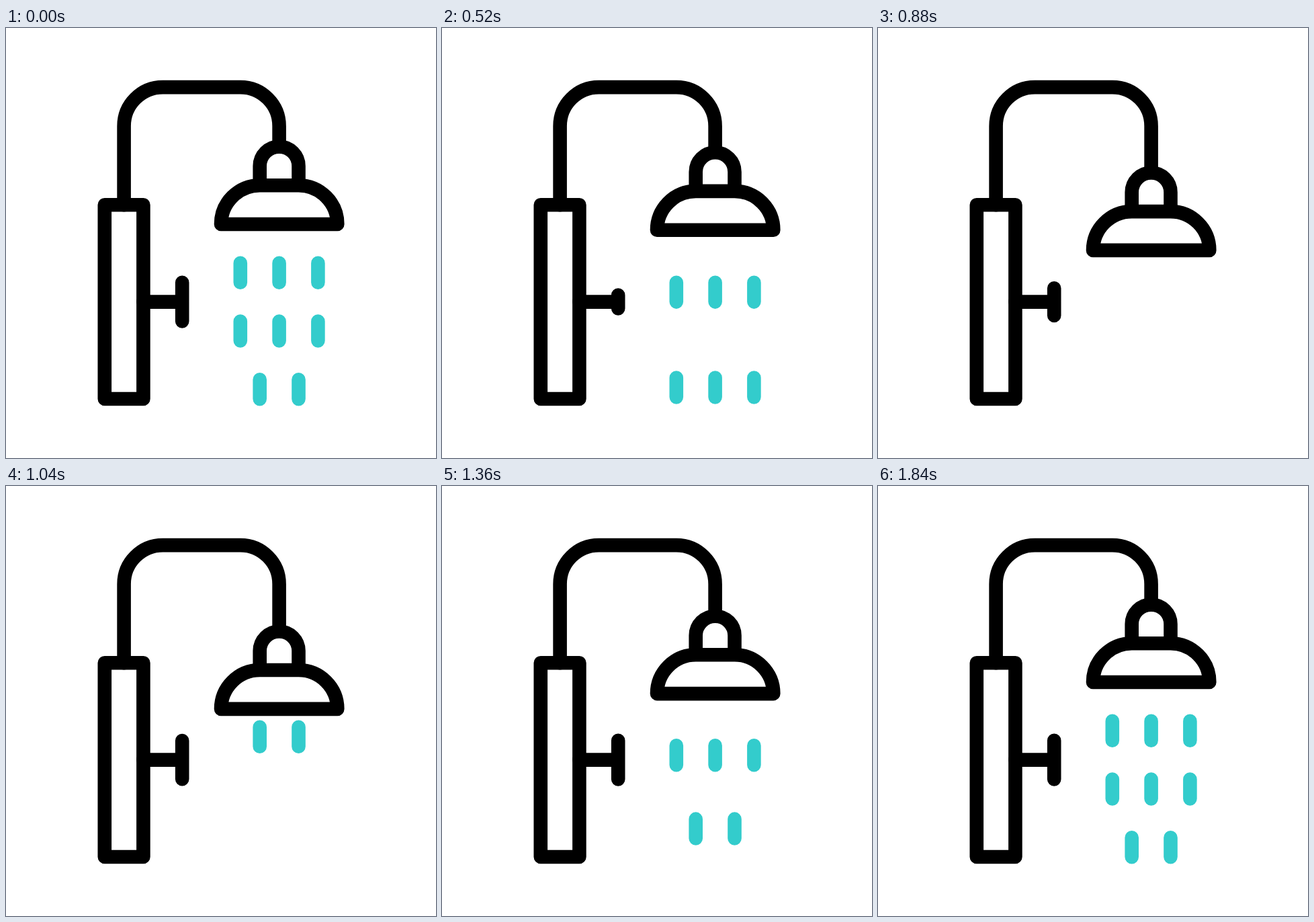
Recreate the animation shown at these times as an HTML page. Size 640 px wide and 640 px high, loop 1.92 s.

```html
<!DOCTYPE html>
<html lang="en">
<head>
<meta charset="utf-8">
<title>Shower</title>
<style>
  html, body { margin: 0; width: 100%; height: 100%; overflow: hidden; background: #fff; }
  svg { display: block; width: 100%; height: 100%; }
  path { fill: none; stroke: #000; stroke-width: 20.6; stroke-linecap: round; stroke-linejoin: round; }
  .drops { stroke: #3cc; }
  #head path { fill: #fff; }
</style>
</head>
<body>
<svg viewBox="0 0 640 640">
  <path class="drops" d="M348.8 349.9v28.9M406.6 349.9v28.9M464.4 349.9v28.9"/>
  <path class="drops" d="M348.8 436.5v28.9M406.6 436.5v28.9M464.4 436.5v28.9"/>
  <path class="drops" d="M377.7 523.2v28.9M435.5 523.2v28.9"/>
  <!-- hides the drops until they leave the head -->
  <rect id="cover" x="330" width="155" fill="#fff"/>
  <path id="pipe"/>
  <path d="M146.8 263.3h57.6v288.7h-57.6z"/>
  <path id="handle"/>
  <g id="head">
    <path d="M377.7 234v-28.5a28.9 28.9 0 0 1 57.8 0V234"/>
    <path d="M320 292a57.8 57.8 0 0 1 57.8-57.8h57.7A57.8 57.8 0 0 1 493.3 292z"/>
  </g>
</svg>
<script>
const LOOP = 1920, STEP = 40;
const get = id => document.getElementById(id);
const [cover, pipe, handle, head] = ['cover', 'pipe', 'handle', 'head'].map(get);
const rows = document.querySelectorAll('.drops');
const leave = [296, 178, 97];
const arrive = [1842, 1728, 1646];

// cubic-bezier(.6, 0, .4, 1)
function ease(x) {
  if (x <= 0) return 0;
  if (x >= 1) return 1;
  let lo = 0, hi = 1, s;
  for (let i = 0; i < 24; i++) {
    s = (lo + hi) / 2;
    const r = 1 - s;
    if (1.8 * s * r * r + 1.2 * s * s * r + s ** 3 < x) lo = s; else hi = s;
  }
  return s * s * (3 - 2 * s);
}

// 0 to 1 between a and b, back to 0 between b and c
const swing = (t, a, b, c) => ease((t - a) / (b - a)) - ease((t - b) / (c - b));

// rows speed up out of the stage, then come from the head and slow down
function dropOffset(t, i) {
  if (t < 880) return 17.5 * (Math.max(0, t - leave[i]) / 184) ** 2.53;
  return -36.5 * (Math.max(0, arrive[i] - t) / 322) ** 2.38;
}

function draw(t) {
  const drop = 40 * swing(t, 240, 1000, 1680);
  const half = 28.9 - 20.2 * swing(t, 140, 630, 1100);
  head.setAttribute('transform', `translate(0 ${drop})`);
  cover.setAttribute('height', 292 + drop);
  pipe.setAttribute('d', `M175.6 263.3V145.9a57.8 57.8 0 0 1 57.8-57.8h115.4a57.8 57.8 0 0 1 57.8 57.8V${176.6 + drop}`);
  handle.setAttribute('d', `M204.4 407.6H262.2M262.2 ${407.6 - half}v${2 * half}`);
  rows.forEach((row, i) => row.setAttribute('transform', `translate(0 ${dropOffset(t, i)})`));
}

const start = performance.now();
function tick() {
  const t = (performance.now() - start) % LOOP;
  draw(Math.floor(t / STEP) * STEP);
  requestAnimationFrame(tick);
}
tick();
</script>
</body>
</html>
```
